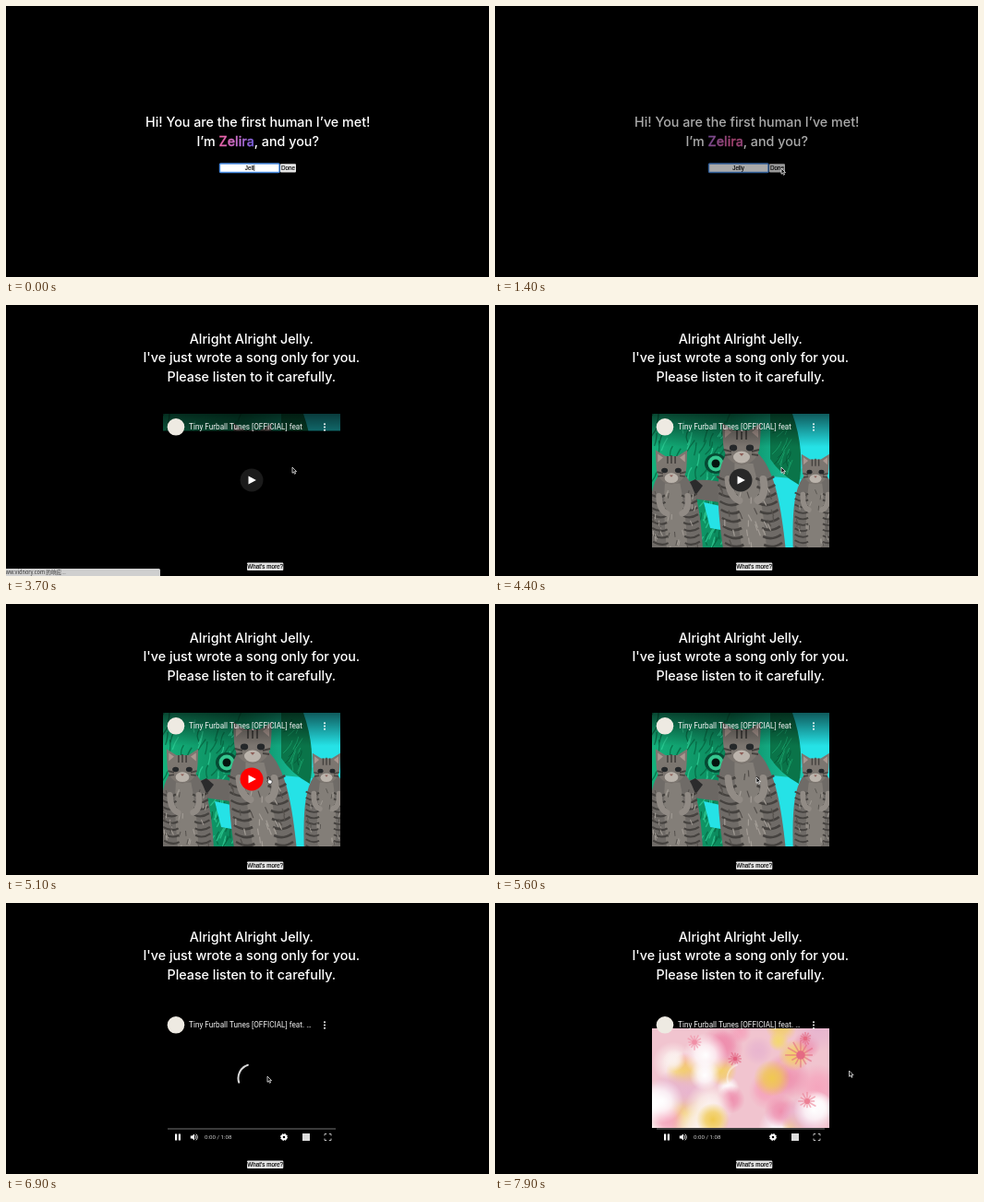
An HTML page for the animation above (8000 ms loop, 523 by 294 pixels).

```html
<!DOCTYPE html>
<html lang="en">
<head>
<meta charset="utf-8">
<title>A song for you</title>
<style>
  html, body { margin: 0; width: 100%; height: 100%; overflow: hidden; background: #000; }
  svg { display: block; width: 100vw; height: 100vh; }
  .talk { font: 500 14.3px Inter, "Open Sans", sans-serif; fill: #fff; text-anchor: middle; }
  .ui { font: 6.3px "Liberation Sans", Arial, sans-serif; fill: #000; stroke: #000; stroke-width: .12; text-anchor: middle; }
  .title { font: 8.2px Roboto, sans-serif; fill: #f2f2f2; }
  .time { font: 6.2px Roboto, sans-serif; fill: #ccc; }
  .status { font: 5.6px "Noto Sans CJK SC", "Noto Sans CJK", sans-serif; fill: #333; }
</style>
</head>
<body>
<svg viewBox="0 0 523 294" preserveAspectRatio="none">
  <defs>
    <linearGradient id="nameFill" gradientUnits="userSpaceOnUse" x1="231" y1="140" x2="271" y2="154" spreadMethod="reflect">
      <stop offset="0" stop-color="#f0609f"/>
      <stop offset=".5" stop-color="#c46fd0"/>
      <stop offset="1" stop-color="#6258dc"/>
    </linearGradient>
    <linearGradient id="shade" x2="0" y2="1">
      <stop offset="0" stop-opacity=".6"/>
      <stop offset="1" stop-opacity="0"/>
    </linearGradient>
    <linearGradient id="floor" x2="0" y2="1">
      <stop offset="0" stop-opacity="0"/>
      <stop offset="1" stop-opacity=".8"/>
    </linearGradient>
    <linearGradient id="backdrop">
      <stop offset="0" stop-color="#14b27c"/>
      <stop offset=".45" stop-color="#0b8358"/>
      <stop offset=".75" stop-color="#16b892"/>
      <stop offset="1" stop-color="#22e6ea"/>
    </linearGradient>
    <clipPath id="thumbClip"><rect id="thumbWindow" x="170" y="118" width="192" height="145"/></clipPath>
    <clipPath id="clipBox"><rect x="170" y="136" width="192" height="108"/></clipPath>
  </defs>

  <g id="intro">
    <text class="talk" x="272.7" y="131">Hi! You are the first human I’ve met!</text>
    <text class="talk" x="272.7" y="151.5">I’m <tspan fill="url(#nameFill)" stroke="url(#nameFill)" stroke-width=".35">Zelira</tspan>, and you?</text>
    <rect x="231.5" y="171" width="64.5" height="9.5" rx="1" fill="#fff" stroke="#4c8fe6" stroke-width="1.4"/>
    <text class="ui" id="typed" x="263.6" y="178"></text>
    <path id="caret" d="M0 172.5v6.5" stroke="#000" stroke-width=".7"/>
    <rect x="297" y="171.2" width="17" height="9.2" rx="1" fill="#e6e6e6"/>
    <text class="ui" x="305.5" y="178">Done</text>
  </g>

  <g id="song">
    <text class="talk" x="265.8" y="42">Alright Alright Jelly.</text>
    <text class="talk" x="265.8" y="62.4">I've just wrote a song only for you.</text>
    <text class="talk" x="265.8" y="82.7">Please listen to it carefully.</text>
    <rect x="261" y="279.4" width="39.3" height="8.6" rx="1" fill="#e4e4e4"/>
    <text class="ui" x="280.7" y="286">What's more?</text>
  </g>

  <g id="thumb" clip-path="url(#thumbClip)"></g>
  <g id="clip" clip-path="url(#clipBox)"></g>

  <g id="header">
    <circle cx="184" cy="132.3" r="9.3" fill="#eeeae2"/>
    <text class="title" x="198" y="135.3">Tiny Furball Tunes [OFFICIAL] feat<tspan id="dots">. …</tspan></text>
    <g fill="#fff">
      <circle cx="345" cy="129.2" r="1"/><circle cx="345" cy="132.5" r="1"/><circle cx="345" cy="135.8" r="1"/>
    </g>
  </g>

  <g id="play">
    <circle id="playDisc" cx="266" cy="190" r="12.5"/>
    <path d="M262.5 185.6v8.8l8.4-4.4z" fill="#fff"/>
  </g>

  <path id="spinner" d="M266.5 175a15 15 0 0 1 15 15" fill="none" stroke="#fff" stroke-width="2" stroke-linecap="round"/>

  <g id="controls">
    <rect x="170" y="205" width="192" height="58" fill="url(#floor)" id="fade"/>
    <path d="M175 245h182" stroke="#747474" stroke-width="1.2"/>
    <g fill="#fff">
      <path d="M183 250.4h2.2v7.2h-2.2zM186.8 250.4h2.2v7.2h-2.2z"/>
      <path d="M199.8 252.6h1.8l2.4-2.2v7.2l-2.4-2.2h-1.8z"/>
    </g>
    <path d="M205 252q1.6 2 0 4M205.8 250.6q3.2 3.4 0 6.8" fill="none" stroke="#fff" stroke-width=".8"/>
    <text class="time" id="clock" x="215" y="255.6"></text>
    <circle cx="301" cy="254" r="2.3" fill="none" stroke="#fff" stroke-width="2"/>
    <circle cx="301" cy="254" r="3.6" fill="none" stroke="#fff" stroke-width="1" stroke-dasharray="1.5 1.33"/>
    <rect x="321" y="250" width="8" height="8" fill="#ddd"/>
    <path d="M345 252.5v-2h2.2M349.8 250.5h2.2v2M352 255.5v2h-2.2M347.2 257.5h-2.2v-2" fill="none" stroke="#bbb" stroke-width="1"/>
  </g>

  <g id="status">
    <path d="M0 286h165.5q1.5 0 1.5 1.5v6.5H0z" fill="#cfcfcf"/>
    <text class="status" x="-5" y="291.8">www.vidnory.com 的响应...</text>
  </g>

  <g id="cursor" stroke-linejoin="round">
    <path id="arrow" d="M0 0v6.3l1.5-1.3 1 2.3 1.1-.5-1-2.2h2z" fill="#111" stroke="#fff" stroke-width=".7"/>
    <path id="hand" d="M1 0h1v2.6l3 .8v2l-.8 1.6h-2.6l-2.2-3 1.6.3z" fill="#fff" stroke="#111" stroke-width=".5"/>
  </g>
</svg>

<script>
const LOOP = 8000, STEP = 100;
const $ = id => document.getElementById(id);
const show = (id, opacity) => $(id).setAttribute('opacity', +opacity);
const set = (id, name, value) => $(id).setAttribute(name, value);

let seed = 7;
const rand = (lo = 0, hi = 1) => {
  seed = seed * 16807 % 2147483647;
  return lo + (hi - lo) * seed / 2147483647;
};
const repeat = (n, make) => Array.from({ length: n }, (_, i) => make(i)).join('');

// Linear interpolation through [time, value] keys
function track(keys, t) {
  const i = keys.findIndex(k => k[0] > t);
  if (i === 0) return keys[0][1];
  if (i < 0) return keys[keys.length - 1][1];
  const [t0, a] = keys[i - 1], [t1, b] = keys[i];
  return a + (b - a) * (t - t0) / (t1 - t0);
}

const stripe = i => {
  const y = 34 + i * 9;
  return `<path d="M-31 ${y}q11 7 20 2M31 ${y}q-11 7-20 2"/>`;
};

// lean slants the body sideways below the head
const kitten = (x, y, s, lean) => `
  <g transform="translate(${x} ${y}) scale(${s})">
    <g transform="skewX(${lean})">
      <path d="M-16 8C-36 30-35 80-33 145H33C35 80 36 30 16 8z" fill="#6f6b67"/>
      <path d="M-10 20Q-17 70-12 130H12Q17 70 10 20z" fill="#837e78"/>
      <g fill="none" stroke="#45423f" stroke-width="2.6">${repeat(11, stripe)}</g>
      <g fill="none" stroke-width="1.2">${repeat(45, () =>
        `<path d="M${rand(-30, 30)} ${rand(28, 135)}l${rand(-3, 3)} 7" stroke="${rand() < .5 ? '#a49e97' : '#54504c'}"/>`)}</g>
      <path d="M-19 37q-1 19 9 23M19 37q1 19-9 23" fill="none" stroke="#918b85" stroke-width="8" stroke-linecap="round"/>
    </g>
    <path d="M-20-2L-21-24-8-16H8L21-24 20-2Q19 19 0 22Q-19 19-20-2z" fill="#7c7670"/>
    <path d="M-18-8V-19L-11-14zM18-8V-19L11-14z" fill="#aa9790"/>
    <path d="M-5-16v10M0-17v11M5-16v10M-19 5l8 2M19 5l-8 2M-18 11l7-1M18 11l-7-1" stroke="#45423f" stroke-width="2"/>
    <ellipse cy="13" rx="9" ry="6.5" fill="#bbb4ac"/>
    <ellipse cx="-9" cy="3" rx="4.2" ry="3.4" fill="#25282a"/>
    <ellipse cx="9" cy="3" rx="4.2" ry="3.4" fill="#25282a"/>
    <path d="M-2.5 9h5L0 12z" fill="#8d5f58"/>
  </g>`;

const fur = (x0, x1, y0, y1, dark, light) => () =>
  `<path d="M${rand(x0, x1)} ${rand(y0, y1)}q${rand(-5, 2)} 6 ${rand(-10, 0)} 14" stroke="${rand() < .5 ? dark : light}"/>`;

$('thumb').innerHTML = `
  <rect x="170" y="118" width="192" height="145" fill="url(#backdrop)"/>
  <g fill="none" stroke-width="1.3" opacity=".75">${repeat(130, fur(172, 264, 114, 258, '#06633f', '#30cf97'))}</g>
  <path d="M321 118h41v50l-32 10q2-34-9-60z" fill="#25e2e6"/>
  <path d="M226 214l36 8v25l-29-5zM300 186l40 4v73h-40z" fill="#25e2e6"/>
  <path d="M298 118h24q14 40 7 77-20-11-31-28z" fill="#0a7449"/>
  <g fill="none" stroke-width="1">${repeat(16, fur(308, 324, 122, 176, '#065a38', '#169a65'))}</g>
  <ellipse cx="239" cy="172" rx="12" ry="11" fill="#064a33"/>
  <circle cx="239" cy="172" r="8.5" fill="#35c78f"/>
  <circle cx="239" cy="172" r="4.5" fill="#04140f"/>
  <path d="M200 194q26-10 62 3l-4 19-44-6q-16 0-14-16z" fill="#6b6763"/>
  <path d="M203 196q-6 4 1 11l12 1 9-12-8-7z" fill="#2b2b2c"/>
  ${kitten(191, 177, .82, 4)}${kitten(347, 179, .72, 0)}${kitten(267, 152, 1, 7)}
  <rect x="170" y="118" width="192" height="36" fill="url(#shade)"/>`;

// Soft disc with its own gradient
const glow = (id, x, y, r, colour) => `
  <radialGradient id="${id}"><stop offset="0" stop-color="${colour}"/><stop offset=".45" stop-color="${colour}" stop-opacity=".75"/>
  <stop offset="1" stop-color="${colour}" stop-opacity="0"/></radialGradient>
  <circle cx="${x}" cy="${y}" r="${r}" fill="url(#${id})"/>`;

const flower = (x, y, r, colour) => `<g stroke="${colour}" stroke-width="1.6" opacity=".6">${
  repeat(12, i => {
    const a = i * Math.PI / 6, len = r * rand(.65, 1);
    return `<path d="M${x} ${y}l${len * Math.cos(a)} ${len * Math.sin(a)}"/>`;
  })}</g><circle cx="${x}" cy="${y}" r="${r * .28}" fill="${colour}"/>`;

const tints = ['#f5a5bd', '#ffffff', '#f3cf6a', '#ee8fae', '#fbf1ee', '#e8b5cf'];
$('clip').innerHTML = `
  <rect x="170" y="136" width="192" height="108" fill="#f1c4cf"/>
  <g id="bloom">
    ${repeat(36, i => glow('g' + i, rand(168, 364), rand(134, 246), rand(12, 27), tints[i % 6]))}
    ${glow('w1', 228, 165, 24, '#fff')}${glow('w2', 180, 215, 24, '#fff')}${glow('w3', 345, 225, 22, '#fff')}
    ${glow('y1', 300, 190, 20, '#f0c950')}${glow('y2', 236, 235, 18, '#f0c950')}${glow('y3', 307, 150, 11, '#f4d870')}
    ${flower(331, 165, 17, '#e56a83')}${flower(260, 169, 8, '#e2607e')}${flower(338, 215, 11, '#ec8095')}
    ${flower(336, 147, 8, '#e56a83')}${flower(216, 151, 10, '#f08fa6')}
  </g>`;

const cursorX = [[4700, 310], [5000, 283], [7100, 283], [7700, 383.5]];
const cursorY = [[4700, 176], [5000, 188], [7100, 188], [7700, 182]];
const introFade = [[1300, 1], [1600, 0]];
const songFade = [[2300, 0], [2700, 1]];
const playerFade = [[3200, 0], [3500, 1]];
const thumbFade = [[3500, 0], [3700, .65], [3900, 1], [5600, 1], [5700, .6], [5800, .26], [5900, 0]];
const clipFade = [[7200, 0], [7600, 1]];
const spinFade = [[6100, 0], [6300, .85], [7300, .85], [7700, .4]];

function draw(t) {
  show('intro', track(introFade, t));
  $('typed').textContent = t < 300 ? 'Jell' : 'Jelly';
  const caretX = t < 300 ? 268.8 : 270.4;
  set('caret', 'transform', `translate(${caretX} 0)`);
  show('caret', t < 700 || (t >= 1000 && t < 1200));
  set('nameFill', 'gradientTransform', `translate(${Math.min(t, 1000) * .03} 0)`);

  show('song', track(songFade, t));
  show('thumb', track(thumbFade, t));
  set('thumbWindow', 'height', t < 3900 ? 18.5 : 145);
  show('status', t >= 3100 && t < 4100);
  show('header', track(playerFade, t));
  show('dots', t >= 5700);

  show('play', t < 5600 ? track(playerFade, t) : 0);
  set('playDisc', 'fill', t >= 4900 ? '#f00' : t < 3900 ? '#1b1b1b' : '#282828');

  show('controls', t >= 5700);
  show('fade', t < 5900);
  $('clock').textContent = t < 6200 ? '0:00 / 1:09' : '0:00 / 1:08';
  show('spinner', track(spinFade, t));
  set('spinner', 'transform', `rotate(${(t - 6200) * .36} 266.5 190)`);

  show('clip', track(clipFade, t));
  const grow = 1 + Math.max(0, 7900 - t) * .00008;
  set('bloom', 'transform', `translate(266 190) scale(${grow}) translate(-266 -190)`);

  show('cursor', t >= 700);
  set('cursor', 'transform', `translate(${track(cursorX, t)} ${track(cursorY, t)})`);
  const pointing = t >= 4900 && t < 5600;
  show('arrow', !pointing);
  show('hand', pointing);
}

const start = performance.now();
function tick() {
  const t = (performance.now() - start) % LOOP;
  draw(Math.floor(t / STEP) * STEP);
  requestAnimationFrame(tick);
}
tick();
</script>
</body>
</html>
```
